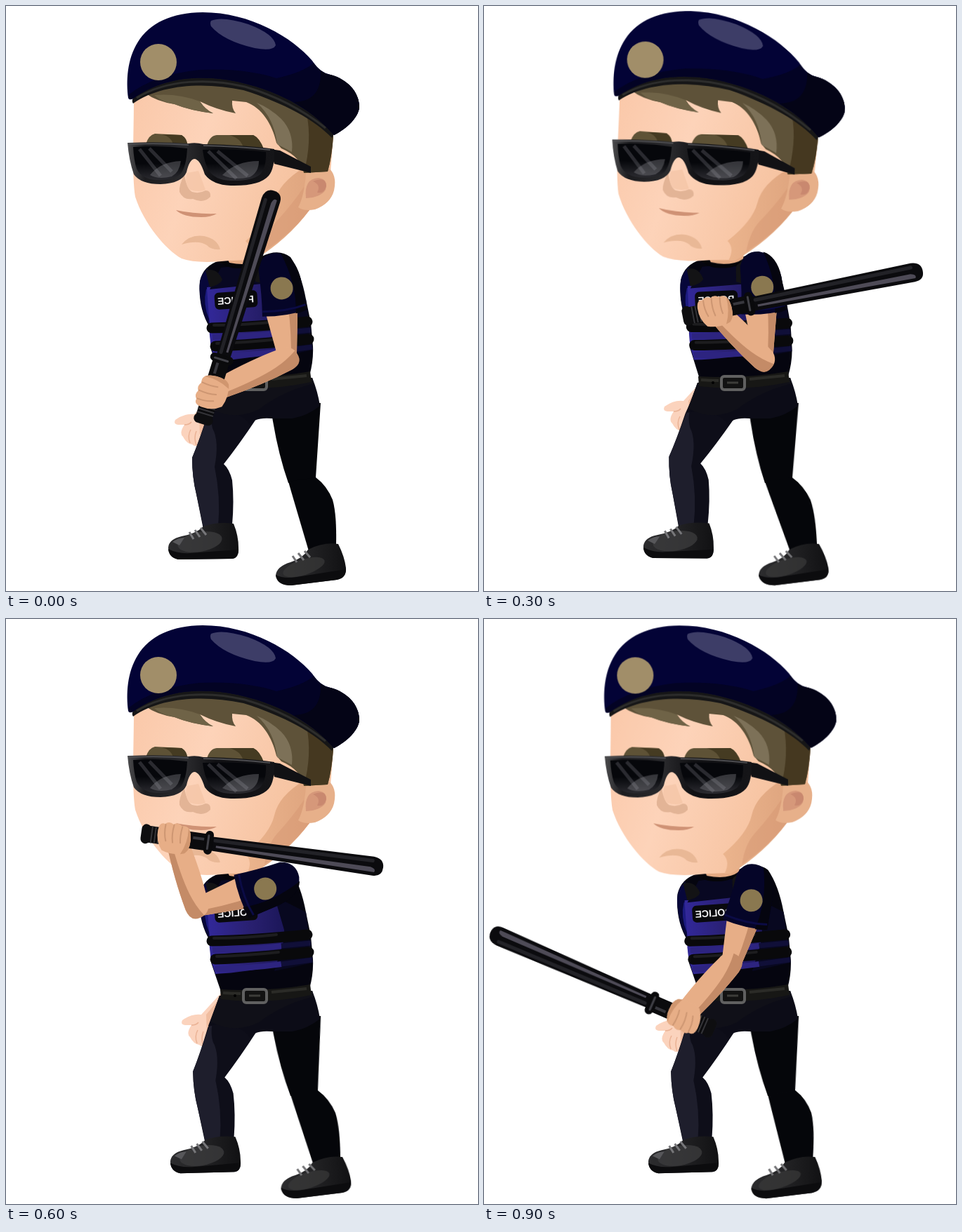
An HTML page that plays this animation: 672 by 834 pixels, repeating every 1 s.

```html
<!DOCTYPE html>
<html lang="en">
<head>
<meta charset="utf-8">
<title>Officer with baton</title>
<style>
html, body { margin: 0; width: 100%; height: 100%; overflow: hidden; background: #fff; }
svg { display: block; width: 100%; height: 100%; }
.patch { font: bold 14px "Liberation Sans", Arial, sans-serif; fill: #f1f1f3; text-anchor: middle; }

/* every pose is held for a tenth of the loop */
.body, .front, .thigh, .shin, .far, .upper, .fore, .grip { animation: 1s step-end infinite; }
.body { animation-name: sway; transform-origin: 350px 545px; }
.front { animation-name: front; transform-origin: 345px 560px; }
.thigh { animation-name: thigh; transform-origin: 410px 560px; }
.shin { animation-name: shin; transform-origin: 420px 678px; }
.far { animation-name: far; }
.upper { animation-name: upper; }
.fore { animation-name: fore; }
.grip { animation-name: grip; }

@keyframes sway {
  0%, 60% { rotate: 0deg } 10% { rotate: .75deg } 20% { rotate: 1.45deg }
  30%, 40% { rotate: 1.55deg } 50% { rotate: .6deg } 70% { rotate: -.6deg }
  80% { rotate: -.5deg } 90% { rotate: -.2deg }
}
@keyframes front {
  0% { rotate: 0deg } 10% { rotate: .55deg } 20%, 30%, 40% { rotate: 1.1deg }
  50% { rotate: .6deg } 60% { rotate: -.8deg } 70% { rotate: -1.6deg }
  80% { rotate: -1.3deg } 90% { rotate: -.8deg }
}
@keyframes thigh {
  0% { transform: skewX(0deg) } 10% { transform: skewX(-.5deg) } 20%, 30% { transform: skewX(-1deg) }
  40% { transform: skewX(-.8deg) } 50% { transform: skewX(.5deg) } 60% { transform: skewX(1.5deg) }
  70% { transform: skewX(2.4deg) } 80% { transform: skewX(1.8deg) } 90% { transform: skewX(1deg) }
}
@keyframes shin {
  0% { transform: skewX(0deg) } 10%, 50% { transform: skewX(2.4deg) } 20% { transform: skewX(4.4deg) }
  30%, 40% { transform: skewX(4.9deg) } 60% { transform: skewX(.4deg) } 70% { transform: skewX(-1.4deg) }
  80% { transform: skewX(-2.6deg) } 90% { transform: skewX(-3.4deg) }
}
@keyframes far {
  0% { translate: 0 0 }
  10% { translate: 6px -12px }
  20% { translate: 12px -16px }
  30% { translate: 16px -19px }
  40% { translate: 19px -21px }
  50% { translate: 13px -16px }
  60% { translate: 10px -18px }
  70% { translate: 8px -20px }
  80% { translate: 6px -16px }
  90% { translate: 4px -10px }
}
@keyframes upper {
  0% { translate: 386px 380px; rotate: -6.5deg }
  10% { translate: 389px 380px; rotate: -11deg }
  20% { translate: 389px 378px; rotate: -14.5deg }
  30% { translate: 391px 378px; rotate: -3deg }
  40% { translate: 394px 376px; rotate: 13.5deg }
  50% { translate: 394px 376px; rotate: 53.5deg }
  60% { translate: 390px 374px; rotate: 73deg }
  70% { translate: 384px 368px; rotate: 87deg }
  80% { translate: 384px 372px; rotate: 53.6deg }
  90% { translate: 383px 378px; rotate: 15.7deg }
}
@keyframes fore {
  0% { translate: 400px 503px; rotate: 66deg }
  10% { translate: 413px 507px; rotate: 87deg }
  20% { translate: 420px 494px; rotate: 109deg }
  30% { translate: 398px 504px; rotate: 136deg }
  40% { translate: 362px 503px; rotate: 158deg }
  50% { translate: 296px 447px; rotate: 161deg }
  60% { translate: 272px 410px; rotate: 163deg }
  70% { translate: 260px 374px; rotate: 161deg }
  80% { translate: 285px 445px; rotate: 103deg }
  90% { translate: 350px 492px; rotate: 42deg }
}
@keyframes grip {
  0% { translate: 293px 550px; rotate: -73deg }
  10% { translate: 304px 513px; rotate: -54.6deg }
  20% { translate: 327px 463px; rotate: -32deg }
  30% { translate: 330px 434px; rotate: -11deg }
  40% { translate: 322px 407px; rotate: 7deg }
  50% { translate: 262px 350px; rotate: 11.2deg }
  60% { translate: 240px 312px; rotate: 8deg }
  70% { translate: 224px 277px; rotate: 1.5deg }
  80% { translate: 178px 422px; rotate: -95deg }
  90% { translate: 284px 567px; rotate: -156.5deg }
}
</style>
</head>
<body>
<svg viewBox="0 0 672 834" fill="none">
  <defs>
    <linearGradient id="skin" x1="0" x2="1" y1="0" y2=".3">
      <stop offset="0" stop-color="#fac8a9"/><stop offset=".4" stop-color="#fdd3b9"/><stop offset="1" stop-color="#f5c09c"/>
    </linearGradient>
    <linearGradient id="jaw" x1="0" x2="1">
      <stop offset="0" stop-color="#ebb48d"/><stop offset="1" stop-color="#dea47e"/>
    </linearGradient>
    <linearGradient id="lens" x1="0" x2="0" y1="0" y2="1">
      <stop offset=".5" stop-color="#06070b"/><stop offset="1" stop-color="#2c2c31"/>
    </linearGradient>
    <linearGradient id="frame" x1="0" x2="1">
      <stop offset="0" stop-color="#4c4c4e"/><stop offset=".12" stop-color="#1c1c1f"/><stop offset=".4" stop-color="#2a2a2d"/><stop offset=".6" stop-color="#101013"/><stop offset="1" stop-color="#151518"/>
    </linearGradient>
    <linearGradient id="vest" x1="0" x2="1">
      <stop offset="0" stop-color="#32289a"/><stop offset=".55" stop-color="#292070"/><stop offset="1" stop-color="#1b1658"/>
    </linearGradient>
    <linearGradient id="shoe" x1="0" x2="1">
      <stop offset="0" stop-color="#2c2c2e"/><stop offset=".45" stop-color="#232325"/><stop offset="1" stop-color="#111113"/>
    </linearGradient>
  </defs>

  <g class="far">
    <path d="M300 547L268 582Q255 580 241 590Q238 596 245 597L254 597Q246 609 252 614Q257 624 265 625Q272 631 275 622L302 580Z" fill="#fbd3bd"/>
    <path d="M254 597Q261 597 264 593M263 604Q258 613 262 623M271 606Q267 616 271 626" stroke="#eab295" stroke-width="1.5"/>
    <path d="M300 552L275 582L276 612L300 580Z" fill="#f0bda0"/>
  </g>

  <g class="thigh">
    <path d="M376 570L380 592Q388 640 402 680L441 680L441 672L448 566Z" fill="#05060a"/>
    <g class="shin">
      <path d="M402 678L406 692L431 777Q452 778 470 768Q471 725 465 704Q457 684 441 672Z" fill="#05060a"/>
      <path d="M430 775Q452 764 473 767Q482 785 484 801Q485 815 471 818L406 826Q386 826 384 812Q385 799 405 793Q423 787 430 775Z" fill="url(#shoe)"/>
      <path d="M384 811Q395 817 414 814L484 803Q484 816 471 818L406 826Q386 826 384 811Z" fill="#0c0c0e"/>
      <ellipse cx="424" cy="800" rx="31" ry="11" transform="rotate(-18 424 800)" fill="#39393a" opacity=".7"/>
      <path d="M408 784L414 793M416 780L424 790M425 777L433 786" stroke="#737376" stroke-width="3"/>
    </g>
  </g>

  <g class="front">
    <path d="M303 545L287 582Q275 620 265 644Q265 672 271 696L281 746Q304 748 322 740Q325 705 322 676Q318 660 310 653Q332 625 356 589L375 555Z" fill="#0e0e19"/>
    <path d="M289 580Q275 620 265 644Q265 672 271 696L281 743L302 742Q306 700 297 657Q304 620 294 602Q291 590 293 579Z" fill="#1e1e2c"/>
    <path d="M281 742Q300 735 324 738Q331 755 331 772Q332 787 322 788L245 789Q231 786 231 772Q232 760 250 756Q271 752 281 742Z" fill="url(#shoe)"/>
    <path d="M231 774Q244 781 262 780L331 775Q331 787 322 788L245 789Q232 786 231 774Z" fill="#0c0c0e"/>
    <ellipse cx="276" cy="764" rx="32" ry="14" transform="rotate(-10 276 764)" fill="#3d3d3e" opacity=".75"/>
    <path d="M237 764Q245 758 254 758L247 769Z" fill="#57575a"/>
    <path d="M261 750L267 760M269 747L276 757M277 744L285 754" stroke="#77777a" stroke-width="3"/>
  </g>

  <path d="M304 537L436 530Q444 550 447 570Q430 584 408 588L378 588Q352 586 348 598Q330 572 288 580Z" fill="#0c0c17"/>
  <path d="M304 537L436 530L438 538Q392 550 360 575Q325 592 291 574Z" fill="#101018"/>

  <g class="body">
    <path d="M304 363Q281 370 276 392Q273 430 290 458L292 490L306 531L432 527Q438 506 437 485L434 452L427 418Q420 380 405 358Q388 345 364 357Z" fill="#05050f"/>
    <path d="M287 374Q273 386 276 410Q278 437 290 456L296 402Z" fill="#07073a"/>
    <path d="M285 404Q280 425 289 446L294 400Z" fill="#1c1b80"/>
    <path d="M286 401Q325 396 362 396L395 408L398 492Q340 504 298 506Q288 478 290 456Q288 432 286 401Z" fill="url(#vest)"/>
    <path d="M306 373Q335 368 361 372L364 396L290 404Z" fill="#080822"/>
    <path d="M284 377Q300 372 308 390Q306 397 290 401ZM354 373Q358 358 372 360Q376 378 367 396L355 393Z" fill="#131315"/>
    <path d="M304 364L362 362Q356 374 332 374Q312 374 304 364Z" fill="#050509"/>
    <path d="M382 395L427 418L434 470L437 490L382 502L398 450Z" fill="#080820"/>
    <path d="M294 472Q350 471 392 466M297 499Q350 498 392 492" stroke="#2d2480" stroke-width="8"/>
    <path d="M392 466L434 462M392 492L436 486" stroke="#100f38" stroke-width="7"/>
    <path d="M293 459Q350 458 429 450M298 485Q350 483 431 475" stroke="#09090b" stroke-width="15" stroke-linecap="round"/>
    <path d="M296 455Q340 455 385 450M300 481Q340 480 388 475" stroke="#1d1d1f" stroke-width="4" stroke-linecap="round"/>
    <g transform="translate(327 419) rotate(-4)">
      <rect x="-30" y="-12" width="61" height="24" rx="6" fill="#09090d"/>
      <text class="patch" transform="scale(-1 1)" y="5">POLICE</text>
    </g>

    <path d="M310 350L366 340L364 360Q348 372 318 366Z" fill="#e5ab84"/>
    <path d="M182 134C182 180 179 240 184 272C196 310 228 348 250 360Q272 368 318 363L348 362Q401 333 432 291L462 236L466 185C430 140 300 90 182 134Z" fill="url(#skin)"/>
    <path d="M425 230Q388 252 382 280Q376 306 341 335Q352 346 343 363L352 363Q401 333 432 291L442 240Z" fill="url(#jaw)"/>
    <path d="M424 258Q408 282 386 306Q372 322 368 350Q404 326 432 291Z" fill="#d79a75" opacity=".55"/>
    <path d="M427 238Q440 226 458 230Q472 240 467 263Q462 282 440 290Q424 293 416 287Q425 270 427 238Z" fill="#e7b08a"/>
    <path d="M427 274Q424 246 445 245Q459 247 455 262Q448 273 427 274Z" fill="#d6987a"/>
    <path d="M437 250Q456 242 456 257Q453 268 443 266Q449 255 437 250Z" fill="#c9886f"/>

    <path d="M198 124C240 102 330 105 400 133C440 153 462 176 466 185Q464 215 458 236L424 238Q420 215 392 203L385 195C379 168 364 145 342 137L322 135Q321 146 327 153Q300 148 276 136Q284 148 295 153Q262 149 240 140Q214 136 198 124Z" fill="#5e5239"/>
    <path d="M211 127Q245 124 276 136Q284 148 295 153Q262 149 240 140Q222 137 211 127Z" fill="#6f6347"/>
    <path d="M357 138Q382 160 386 197L407 208Q410 180 392 161Q375 145 357 138Z" fill="#7d7158"/>
    <path d="M428 153Q454 172 466 185Q464 215 458 236L424 238Q436 194 428 153Z" fill="#453820"/>

    <path d="M181 139Q178 134 182 130C218 100 280 94 344 107C406 121 450 154 468 180L464 188C440 163 398 139 338 120C280 108 220 112 181 139Z" fill="#161617"/>
    <path d="M186 131C230 104 290 103 340 115Q405 134 455 174" stroke="#2d2d2c" stroke-width="3"/>
    <path d="M174 131C171 108 172 76 188 51C204 25 236 9 280 9C348 9 408 45 436 78Q447 95 462 98C485 104 503 122 503 144C502 161 480 178 467 184C440 153 400 124 330 108C270 96 220 104 181 132Q175 135 174 131Z" fill="#030336"/>
    <path d="M174 127Q210 98 275 91Q340 88 385 103Q425 94 438 81Q447 95 462 98C485 104 503 122 503 144C502 161 480 178 467 184C440 153 400 124 330 108C270 96 220 104 181 132Q175 135 174 127Z" fill="#030324"/>
    <path d="M448 92Q455 98 462 98C485 104 503 122 503 144C502 161 480 178 467 184Q445 158 410 137Q450 136 448 92Z" fill="#040416"/>
    <path d="M292 21Q308 14 345 26Q382 40 384 56Q380 65 354 60Q310 50 292 29Q290 24 292 21Z" fill="#3d3d67"/>
    <circle cx="217" cy="80" r="26" fill="#a18e69"/>

    <path d="M199 197Q203 184 212 182L250 184Q258 189 258 198ZM286 199Q290 185 300 184L352 184Q361 188 367 204Z" fill="#5e5236"/>
    <path d="M222 183Q235 186 238 197L258 198Q258 189 250 184ZM318 184Q334 188 338 202L367 204Q361 188 352 184Z" fill="#453b22"/>

    <path d="M254 240Q246 255 247 265Q252 277 266 275Q281 282 291 272Q292 263 284 263Q275 268 265 265Q257 261 254 240Z" fill="#deb091" opacity=".85"/>
    <path d="M258 238Q253 252 262 262Q275 266 284 262L274 235Z" fill="#f2c2a2" opacity=".6"/>
    <path d="M242 291Q270 297 300 296Q292 301 278 301Q252 301 242 291Z" fill="#cf9275"/>
    <path d="M250 340Q262 325 282 328Q301 332 305 347Q292 348 286 341Q274 333 250 340Z" fill="#e9b896"/>

    <path d="M376 204L390 206L434 229L434 238L382 225Z" fill="#111114"/>
    <path d="M173 195Q220 193 260 196Q270 194 281 197Q340 198 382 204Q383 231 374 242Q361 257 320 256Q294 255 283 240Q276 218 268 218Q261 219 257 237Q250 253 220 254Q192 254 182 240Q175 220 173 195Z" fill="url(#frame)"/>
    <path d="M181 201Q220 198 258 203Q257 228 249 239Q239 248 215 248Q193 247 186 232Q182 220 181 201ZM280 205Q330 203 370 208Q371 230 362 240Q350 250 320 249Q296 248 288 233Q282 222 280 205Z" fill="url(#lens)"/>
    <path d="M205 241Q220 222 249 221Q247 237 236 243Q217 248 205 241ZM308 241Q327 221 360 221Q360 237 347 244Q324 249 308 241Z" fill="#85858a" opacity=".38"/>
    <path d="M190 204L220 242M204 203L236 236M288 207L328 246M301 207L344 242" stroke="#aaa9b0" stroke-width="5" opacity=".22"/>
    <path d="M174 197Q220 195 260 198M281 199Q330 200 376 205" stroke="#4d4d50" stroke-width="2"/>
  </g>

  <path d="M305 528Q370 532 433 521L435 536Q370 550 306 542Z" fill="#171715"/>
  <path d="M309 533Q322 534 334 534M378 532L428 527" stroke="#2b2b27" stroke-width="4"/>
  <circle cx="326" cy="537" r="2" fill="#000"/>
  <rect x="338" y="528" width="33" height="19" rx="4" fill="#121212" stroke="#606060" stroke-width="4"/>
  <path d="M346 537L362 537" stroke="#3c3c39" stroke-width="3"/>

  <g class="upper">
    <path d="M-24 48L24 48L15 116Q10 136 -6 132Q-16 122 -14 112Z" fill="#e7ae87"/>
    <path d="M24 48L15 116Q12 128 5 132Q11 88 10 48Z" fill="#c48b67"/>
    <path d="M-26 -8Q-20 -30 2 -28Q26 -23 32 10L37 57Q8 64 -28 60Q-25 30 -26 -8Z" fill="#050528"/>
    <path d="M8 -27Q27 -20 32 10L37 57Q30 60 20 61Q26 18 8 -27Z" fill="#05050f"/>
    <path d="M-27 53Q8 57 35 50" stroke="#0b0b45" stroke-width="3"/>
    <circle cx="4" cy="23" r="16" fill="#8a7850"/>
  </g>

  <g class="fore">
    <path d="M-17 4A17 18 0 0 1 17 0Q20 45 15 102L-15 102Q-20 45 -17 4Z" fill="#e7ae87"/>
    <path d="M-6 -15Q15 -22 17 0Q20 45 15 102L8 102Q10 50 5 20Q2 2 -6 -15Z" fill="#c48b67"/>
  </g>

  <g class="grip">
    <path d="M48 -9L285 -13Q300 -12 300 1Q300 14 286 14L48 11Z" fill="#0b0b0e"/>
    <path d="M58 -4L284 -7" stroke="#222227" stroke-width="5" stroke-linecap="round"/>
    <path d="M60 3L282 2Q291 4 288 9L60 6Z" fill="#4e4b57"/>
    <rect x="-40" y="-12" width="92" height="24" rx="4" fill="#0b0b0d"/>
    <rect x="-48" y="-14" width="14" height="28" rx="7" fill="#0e0e10"/>
    <path d="M-33 -12V12M-28 -12V12M-23 -12V12" stroke="#343438" stroke-width="2"/>
    <path d="M26 -4H42" stroke="#37373d" stroke-width="4"/>
    <rect x="43" y="-17" width="12" height="34" rx="6" fill="#0a0a0c"/>
    <path d="M48 -10V9" stroke="#404046" stroke-width="3" stroke-linecap="round"/>
    <path d="M-25 -8Q-24 -20 -16 -18Q-11 -23 -4 -19Q2 -23 8 -18Q19 -21 22 -8Q26 8 17 20Q0 26 -16 20Q-26 8 -25 -8Z" fill="#e7ae87"/>
    <path d="M-15 -17Q-16 -4 -12 6M-3 -18Q-5 -4 -2 7M9 -17Q7 -4 9 6" stroke="#cd9672" stroke-width="2" stroke-linecap="round"/>
    <path d="M18 -16Q23 -10 23 2Q24 14 17 20L11 22Q20 4 18 -16Z" fill="#d0966f"/>
  </g>
</svg>
</body>
</html>
```
